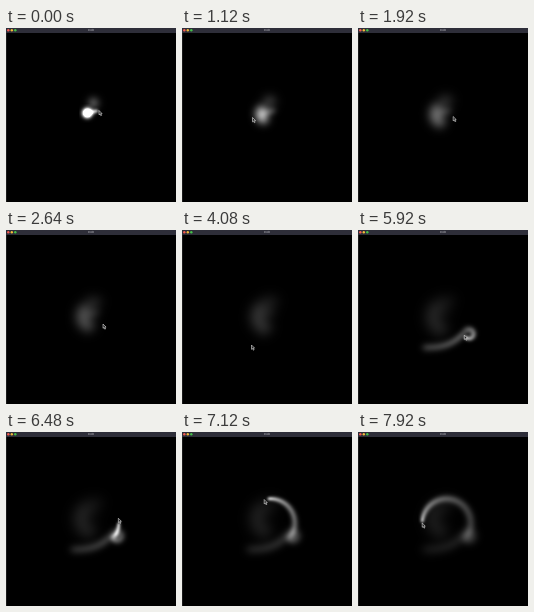
Write an HTML page with a canvas that moves like this. It is 170x174 px and loops after 8 s.

```html
<!DOCTYPE html>
<html lang="en">
<head>
<meta charset="utf-8">
<title>Fluid</title>
<style>
  html, body { margin: 0; width: 100%; height: 100%; overflow: hidden; background: #000; }
  canvas, svg { position: absolute; left: 0; top: 0; width: 170px; height: 174px; }
  text { font: 500 2.5px Inter, "Open Sans", sans-serif; fill: #b4b4bc; text-anchor: middle; }
</style>
</head>
<body>
<canvas id="smoke" width="170" height="174"></canvas>
<svg viewBox="0 0 170 174">
  <rect width=".4" height="174" fill="#444"/>
  <rect width="170" height="5" fill="#2e2e39"/>
  <circle cx="2.3" cy="2.3" r="1.2" fill="#f45c52"/>
  <circle cx="5.8" cy="2.3" r="1.2" fill="#f0b93a"/>
  <circle cx="9.3" cy="2.3" r="1.2" fill="#45c04a"/>
  <text x="85" y="3.1">Fluid</text>
  <path id="cursor" d="M0 0V4.3L1 3.5L1.8 5.2L2.6 4.8L1.8 3.1H3.1Z"
        fill="#222" stroke="#ddd" stroke-width=".6" stroke-linejoin="round"/>
</svg>
<script>
const W = 170, H = 174, LOOP = 8000, STEP = 80;
const GAP = 20, LAG = 70, INK = 115;
const SWEEP = 4400, RING = 4960, REST = 5920, ARC = 6240, END = 7920;
const ctx = document.getElementById('smoke').getContext('2d');
const cursor = document.getElementById('cursor');
const image = ctx.createImageData(W, H);
const field = new Float32Array(W * H);

// Idle pointer: time, x, y
const hover = [
  [-320, 82, 85], [0, 93, 82.5], [880, 75, 95], [1120, 70.5, 89.5],
  [1760, 95, 88], [2640, 97, 94], [4080, 69.5, 115], [SWEEP, 66, 117.5]
];

const mix = (a, b, u) => a + (b - a) * u;
const mixPoint = (p, q, u) => [mix(p[0], q[0], u), mix(p[1], q[1], u)];
const smooth = u => u * u * (3 - 2 * u);
const part = (t, from, to) => Math.min(Math.max((t - from) / (to - from), 0), 1);
const around = (x, y, r, a) => [x + r * Math.cos(a), y + r * Math.sin(a)];

const wander = t => {
  const i = hover.findIndex(k => k[0] > t), a = hover[i - 1], b = hover[i];
  return mixPoint(a.slice(1), b.slice(1), smooth(part(t, a[0], b[0])));
};
const sweep = u => [mix(66, 106.5, u), mix(117.5, 102.3, u ** 3)];
const ring = u => around(111, 104, 4.8, mix(3.5, 9.2, u));
const arc = u => around(88.5, 91, 24.3, mix(0.5, -Math.PI, 1 - (1 - u) ** 1.38));

function pointer(t) {
  if (t < SWEEP) return wander(t);
  if (t < RING) return sweep(part(t, SWEEP, RING));
  if (t < REST) return ring(part(t, RING, REST));
  if (t < ARC) return mixPoint(ring(1), arc(0), smooth(part(t, REST, ARC)));
  return arc(part(t, ARC, END));
}

function addPuff([x, y], size, level) {
  const r = size * 3;
  for (let j = Math.max(5, Math.ceil(y - r)); j <= Math.min(H - 1, y + r); j++) {
    for (let i = Math.max(0, Math.ceil(x - r)); i <= Math.min(W - 1, x + r); i++) {
      const d = (i + .5 - x) ** 2 + (j + .5 - y) ** 2;
      field[j * W + i] += level * Math.exp(-d / (2 * size * size));
    }
  }
}

// Two old blobs drift apart into a crescent
function addCloud(t) {
  const count = 12, spread = 1 - Math.exp(-t / 2000);
  for (let i = 0; i < count; i++) {
    const upper = i < 3;
    const from = upper ? [87.5, 75] : [81.3, 85];
    const angle = mix(-1.3, -4.6, i / (count - 1));
    const to = around(88, 87, i % 2 ? 12 : 18, angle);
    const s0 = upper ? 4.5 : 3, size = mix(s0, 6.5, spread);
    const level = (upper ? 22 : 70) * (s0 / size) ** 2 * Math.exp(-t / 9000);
    addPuff(mixPoint(from, to, spread), size, level);
  }
}

// Ink is laid per distance moved, then widens and fades
function addStroke(t, from, to) {
  for (let born = from; born < Math.min(to, t - LAG); born += GAP) {
    const [x, y] = pointer(born), [nx, ny] = pointer(born + GAP);
    const age = (t - born) / 1000, size = 0.9 + 2 * Math.sqrt(age);
    const ink = INK * Math.hypot(nx - x, ny - y);
    addPuff([x, y], size, ink / size ** 2 * Math.exp(-age / 3));
  }
}

function draw(t) {
  field.fill(0);
  addCloud(t);
  addStroke(t, hover[0][0], 0);
  addStroke(t, SWEEP, END);
  for (let i = 0; i < field.length; i++) {
    image.data.fill(field[i], i * 4, i * 4 + 3);
    image.data[i * 4 + 3] = 255;
  }
  ctx.putImageData(image, 0, 0);
  cursor.setAttribute('transform', `translate(${pointer(t).map(v => v.toFixed(2)).join(' ')})`);
}

let start, last = -1;
function tick(now) {
  start ??= now;
  const t = Math.floor((now - start) % LOOP / STEP) * STEP;
  if (t !== last) draw(last = t);
  requestAnimationFrame(tick);
}
draw(0);
requestAnimationFrame(tick);
</script>
</body>
</html>
```
